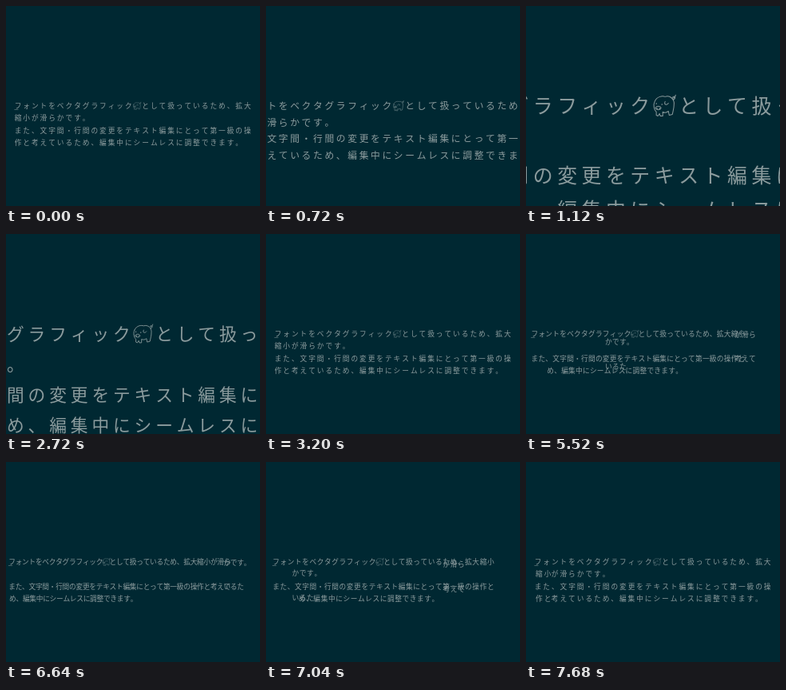
An HTML page with a canvas for the animation above (8 s loop, 318 by 250 pixels).

```html
<!DOCTYPE html>
<html lang="ja">
<head>
<meta charset="utf-8">
<title>Text zoom and letter spacing</title>
<style>
  html, body { margin: 0; width: 100%; height: 100%; overflow: hidden; background: #002832; }
  canvas { display: block; width: 318px; height: 250px; }
</style>
</head>
<body>
<canvas id="stage" width="318" height="250"></canvas>
<script>
const ctx = document.getElementById('stage').getContext('2d');
const WIDTH = 318, HEIGHT = 250, LOOP = 8000, TICK = 80;
const PAPER = '#002832', INK = '#8b9b9d';
const FONT_SIZE = 8.7, LINE = 15.2, MAX_ZOOM = 4, PIG = '*';
const CENTER_X = WIDTH / 2 - 0.35, FIRST_LINE = HEIGHT / 2 - 0.2;

const paragraphs = [
  'フォントをベクタグラフィック*として扱っているため、拡大縮小が滑らかです。',
  'また、文字間・行間の変更をテキスト編集にとって第一級の操作と考えているため、編集中にシームレスに調整できます。'
];
const glyphs = paragraphs.flatMap((text, par) =>
  [...text].map((char, index) => ({ char, par, index })));

// Each layout: letter pitch and characters per line.
const layouts = [[10.64, 28], [9.9, 30], [9.15, 33], [8.4, 36]].map(([pitch, count]) => {
  const hangs = g => g.index === count && '、。'.includes(g.char);
  const widest = count + (glyphs.some(hangs) ? 1 : 0);
  const left = CENTER_X - widest * pitch / 2;
  return glyphs.map(g => {
    const wraps = g.index >= count && !hangs(g);
    const column = wraps ? g.index - count : g.index;
    return {
      x: left + (column + 0.5) * pitch,
      y: FIRST_LINE + (g.par * 2 + (wraps ? 1 : 0)) * LINE
    };
  });
});

// Spacing changes overlap; each one eases on its own clock.
const STEP_TIME = 550;
const steps = [
  [4880, 0, 1], [5045, 1, 2], [5306, 2, 3],
  [6580, 3, 2], [6870, 2, 1], [7155, 1, 0]
];

const progress = (t, start, length) => Math.min(1, Math.max(0, (t - start) / length));
const easeInOut = u => (1 - Math.cos(Math.PI * u)) / 2;
const smooth = u => u * u * (3 - 2 * u);

function zoomAt(t) {
  const level = t < 2640
    ? smooth(progress(t, 400, 1060))
    : Math.pow(1 - progress(t, 2640, 560), 2.69);
  return Math.pow(MAX_ZOOM, level);
}

function positionAt(i, t) {
  let { x, y } = layouts[0][i];
  for (const [start, from, to] of steps) {
    const amount = easeInOut(progress(t, start, STEP_TIME));
    x += amount * (layouts[to][i].x - layouts[from][i].x);
    y += amount * (layouts[to][i].y - layouts[from][i].y);
  }
  return { x, y };
}

// Body and legs, snout, ears, eye, tail.
const pig = new Path2D(`
  M-12 -5 C-9 -12 -2 -12 1 -11 C7 -13 13 -8 12 -1 C12 3 11 6 10 11
  L6 12 L5 7 C3 9 0 9 -2 8 L-2 13 L-5 13 L-6 10 L-8 13 L-10 12
  L-10 8 C-13 5 -14 -1 -12 -5
  M-11 3 C-10 0 -5 0 -4 3 C-5 6 -10 6 -11 3 M-9 3 L-9 4 M-6 3 L-6 4
  M1 -5 C-1 -1 3 0 5 -3 M-10 -3 L-10 -2 M-3 -2 L-3 -1
  M11 -7 C15 -9 13 -12 11 -11 C9 -9 13 -8 14 -13`);

function drawPig(x, y) {
  ctx.save();
  ctx.translate(x, y);
  ctx.scale(0.352, 0.352);
  ctx.lineWidth = 1;
  ctx.stroke(pig);
  ctx.restore();
}

function draw(t) {
  const zoom = zoomAt(t);
  ctx.setTransform(1, 0, 0, 1, 0, 0);
  ctx.fillStyle = PAPER;
  ctx.fillRect(0, 0, WIDTH, HEIGHT);
  ctx.translate(WIDTH / 2, HEIGHT / 2);
  ctx.scale(zoom, zoom);
  ctx.translate(-WIDTH / 2, -HEIGHT / 2);
  ctx.font = `300 ${FONT_SIZE}px "Noto Sans CJK JP", "Noto Sans CJK", sans-serif`;
  ctx.textBaseline = 'alphabetic';
  ctx.fillStyle = ctx.strokeStyle = INK;
  ctx.lineJoin = ctx.lineCap = 'round';

  glyphs.forEach(({ char }, i) => {
    const { x, y } = positionAt(i, t);
    if (char === PIG) drawPig(x, y);
    else ctx.fillText(char, x - FONT_SIZE / 2, y + FONT_SIZE * 0.38);
    if (i === 0) ctx.fillRect(x - 4.6, y + 4.6, 5, 0.5);
  });
}

const origin = performance.now();
function frame() {
  const t = (performance.now() - origin) % LOOP;
  draw(Math.floor(t / TICK) * TICK);
  requestAnimationFrame(frame);
}
frame();
</script>
</body>
</html>
```
